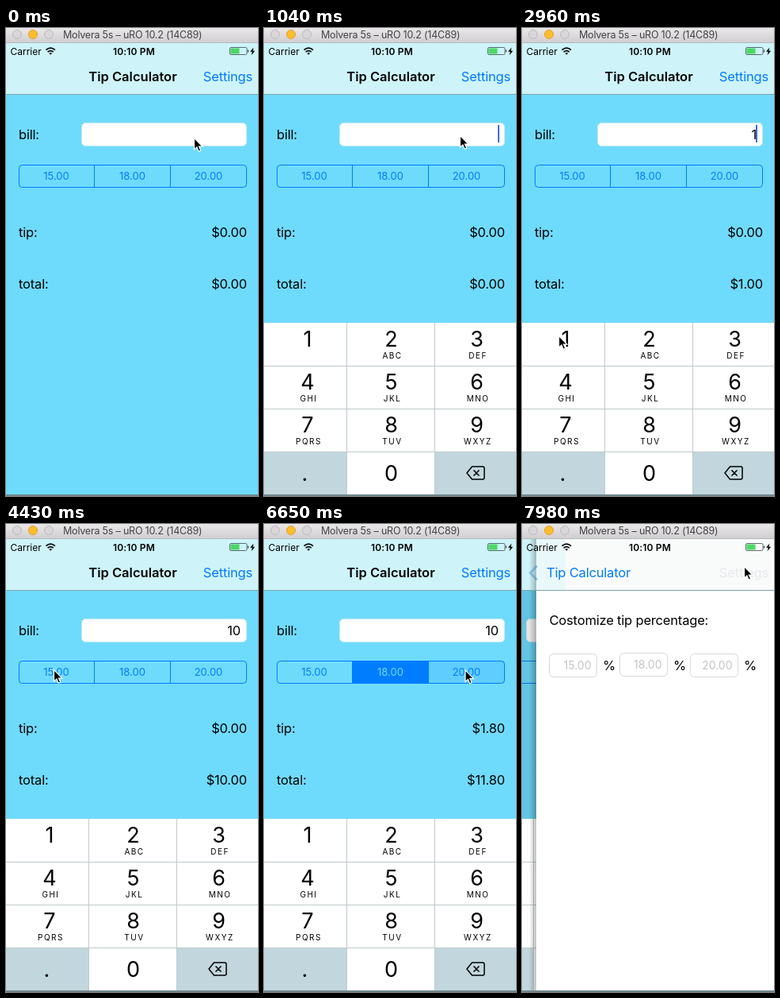
Recreate the animation shown at these times as an HTML page. Size 318 by 589 pixels, loop 8000 ms.

```html
<!DOCTYPE html>
<html lang="en">
<head>
<meta charset="utf-8">
<title>Tip Calculator</title>
<style>
  html, body { margin: 0; width: 100%; height: 100%; overflow: hidden; background: #fff; }
  svg { display: block; width: 318px; height: 589px; cursor: default; }
  text { font: 16.5px Inter, Roboto, sans-serif; letter-spacing: -.18px; white-space: pre; }
  .end { text-anchor: end; }
  .mid { text-anchor: middle; }
  .blue { fill: #007aff; }
  .title { font-weight: 600; letter-spacing: 0; }
  .small { font-size: 12px; letter-spacing: 0; }
  .clock { font-weight: 600; letter-spacing: .15px; }
  .window { font-size: 12.5px; letter-spacing: -.2px; fill: #444; }
  .seg { font-size: 13px; letter-spacing: 0; }
  .digit { font-size: 27px; letter-spacing: 0; }
  .abc { font-size: 10px; letter-spacing: 1.5px; }
  .hint { font-size: 14px; letter-spacing: 0; fill: #c4c4c9; }
</style>
</head>
<body>
<svg viewBox="0 0 318 589">
  <defs>
    <linearGradient id="chrome" x2="0" y2="1">
      <stop stop-color="#e9e7e9"/><stop offset="1" stop-color="#d1cfd1"/>
    </linearGradient>
    <linearGradient id="edge">
      <stop stop-opacity="0"/><stop offset="1" stop-opacity=".25"/>
    </linearGradient>
    <clipPath id="segClip"><rect x="16" y="172" width="288" height="29" rx="4"/></clipPath>
  </defs>

  <g id="main">
    <rect y="84" width="420" height="505" fill="#6fdbfc"/>
    <text x="16" y="140">bill:</text>
    <text x="16" y="263">tip:</text>
    <text x="16" y="328">total:</text>
    <rect x="95.5" y="119.5" width="208" height="29" rx="5" fill="#fff" stroke="#c3e8f2"/>
    <text id="bill" class="end" x="296" y="139.5"></text>
    <rect id="caret" x="295" y="122" width="2" height="22" fill="#426bd9"/>
    <g id="segments"></g>
    <text id="tip" class="end" x="304" y="263"></text>
    <text id="total" class="end" x="304" y="328"></text>
  </g>
  <rect id="dim" y="84" width="318" height="505" opacity=".1"/>
  <g id="keys"></g>

  <g id="settings">
    <rect x="9" y="84" width="9" height="505" fill="url(#edge)"/>
    <rect x="18" y="84" width="300" height="505" fill="#fff"/>
    <text x="34.5" y="127">Costomize tip percentage:</text>
  </g>

  <rect y="18" width="318" height="65" fill="#cef4f9"/>
  <g id="pushedNav">
    <rect x="9" y="18" width="9" height="65" fill="url(#edge)"/>
    <rect x="18" y="18" width="37" height="65" fill="#e9f8fb"/>
    <rect x="55" y="18" width="263" height="65" fill="#f9fbfb"/>
    <path d="M19 52.500l-8.500 9 8.500 9" fill="none" stroke="#3f86cc" stroke-width="3" opacity=".45"/>
    <text class="blue" x="31" y="67">Tip Calculator</text>
  </g>
  <rect y="83" width="318" height="1" fill="#7ea6b0"/>
  <text id="title" class="title mid" x="160" y="67">Tip Calculator</text>
  <text id="gear" class="blue end" x="311" y="67">Settings</text>

  <text class="small" x="5.500" y="34">Carrier</text>
  <g fill="none" stroke="#000" stroke-width="1.700">
    <path d="M50.500 27.700q5.700-5 11.400 0M52.600 30.200q3.600-3 7.200 0"/>
    <path d="M54.300 31.800q1.900-1.500 3.800 0l-1.900 2z" fill="#000" stroke="none"/>
  </g>
  <text class="small clock mid" x="161.500" y="34">10:10 PM</text>
  <rect x="282.500" y="24.500" width="21.500" height="9" rx="1.500" fill="none" stroke="#3b4a4d" stroke-width=".8"/>
  <rect x="283.500" y="25.500" width="11" height="7" fill="#4cd964"/>
  <rect x="304.800" y="27.500" width="1.300" height="3" fill="#3b4a4d"/>
  <path d="M312.500 24.500l-4.500 5.300h2.700l-1.200 4.400 4.700-5.500h-2.800z"/>

  <rect width="318" height="18" fill="url(#chrome)"/>
  <rect y="18" width="318" height="1" fill="#b5b9bb"/>
  <circle cx="14" cy="8" r="5.500" fill="#d8d6d8" stroke="#bbb9bb"/>
  <circle cx="34" cy="8" r="5.500" fill="#fdbd2f" stroke="#e0a029"/>
  <circle cx="54" cy="8" r="5.500" fill="#d8d6d8" stroke="#bbb9bb"/>
  <text class="window" x="72" y="13">Molvera 5s – uRO 10.2 (14C89)</text>
  <rect y="587" width="318" height="2" fill="#70878e"/>
  <path id="arrow" d="M0 0v14.500l3.400-3.100 2.300 5.300 2.500-1.100-2.300-5h4.500z" stroke="#fff" stroke-width="1.200"/>
</svg>
<script>
const LOOP = 8000, TICK = 147.7;       // the screen refreshes once per tick
const PRESS = 295, BLINK = 960, LIT = 590;
const $ = id => document.getElementById(id);

function add(parent, tag, attrs, text = '') {
  const el = document.createElementNS('http://www.w3.org/2000/svg', tag);
  for (const k in attrs) el.setAttribute(k, attrs[k]);
  el.textContent = text;
  return parent.appendChild(el);
}

// Segmented control
const rates = [15, 18, 20];
const segs = rates.map((rate, i) => {
  const box = add($('segments'), 'rect', {
    x: 16 + 96 * i, y: 172, width: 96, height: 29, fill: '#007dff', 'clip-path': 'url(#segClip)'
  });
  const label = add($('segments'), 'text', { class: 'seg mid', x: 63.5 + 96 * i, y: 191 }, rate.toFixed(2));
  return { box, label };
});
add($('segments'), 'rect', { x: 16.5, y: 172.5, width: 287, height: 28, rx: 4, fill: 'none', stroke: '#007aff' });
add($('segments'), 'path', { d: 'M111.500 172v29M207.500 172v29', stroke: '#007aff' });

// Keypad
const letters = ['', 'ABC', 'DEF', 'GHI', 'JKL', 'MNO', 'PQRS', 'TUV', 'WXYZ'];
const keys = {};
[...'123456789.0<'].forEach((name, i) => {
  const col = i % 3, y = 371 + 54 * Math.floor(i / 3), cx = 54 + 108 * col - col * (col - 1) / 2 * 0 + (col ? -1.5 : 1);
  const fill = '.<'.includes(name) ? '#c2d6dd' : '#fff';
  const rect = add($('keys'), 'rect', { x: Math.max(0, 111 * col - 6), y, width: 111, height: 54, fill });
  keys[name] = { rect, fill };
  if (name === '<') {
    add($('keys'), 'path', {
      d: 'M262.500 552h13.500q2 0 2 2v12q0 2-2 2h-13.500l-6.500-8zM264.500 556.500l7 7M271.500 556.500l-7 7',
      fill: 'none', stroke: '#000', 'stroke-width': 1.5, 'stroke-linejoin': 'round'
    });
    return;
  }
  add($('keys'), 'text', { class: 'digit mid', x: name === '.' ? 51.5 : cx, y: y + (i > 8 ? 37 : 30) }, name);
  if (letters[i]) add($('keys'), 'text', { class: 'abc mid', x: cx + 1.5, y: y + 45 }, letters[i]);
});
add($('keys'), 'path', {
  d: 'M0 425.500h318M0 479.500h318M0 533.500h318M104.500 371v216M215.500 371v216', stroke: '#c0cacd', fill: 'none'
});

// Settings fields
rates.forEach((rate, i) => {
  const x = 34.5 + 89 * i, y = i === 1 ? 162.5 : 163.5;
  add($('settings'), 'rect', { x, y, width: 60, height: 29, rx: 5, fill: '#fff', stroke: '#d8d8d8' });
  add($('settings'), 'text', { class: 'hint end', x: x + 53, y: y + 19.5 }, rate.toFixed(2));
  add($('settings'), 'text', { x: x + 67.5, y: 183.5 }, '%');
});

// Where the pointer rests, when, and what it taps there
const stops = [
  { x: 237.5, y: 138.5, from: 0, to: 590 },
  { x: 247.5, y: 135.5, from: 1030, to: 1950 },
  { x: 80, y: 512, from: 2300, to: 2300 },
  { x: 46.5, y: 387.5, from: 2500, to: 2960, tap: 2800, key: '1' },
  { x: 148, y: 570, from: 3540, to: 3850, tap: 3840, key: '0' },
  { x: 60.5, y: 183.5, from: 4430, to: 5020, tap: 4870, seg: 0 },
  { x: 157.5, y: 183.5, from: 5700, to: 6210, tap: 6060, seg: 1 },
  { x: 254, y: 184, from: 6640, to: 7000, tap: 6940, seg: 2 },
  { x: 280.5, y: 53.5, from: 7530, to: LOOP, tap: 7970, push: true }
];
const FOCUS = 700, KEYS_UP = 1030;

const clamp = v => Math.min(1, Math.max(0, v));
const smooth = v => v * v * (3 - 2 * v);
const money = v => '$' + v.toFixed(2);
const show = (id, on) => $(id).setAttribute('visibility', on ? 'visible' : 'hidden');

function pointer(t) {
  const i = stops.findLastIndex(s => t >= s.from), a = stops[i], b = stops[i + 1] || a;
  const f = a === b ? 0 : smooth(clamp((t - a.to) / (b.from - a.to)));
  return [a.x + (b.x - a.x) * f, a.y + (b.y - a.y) * f];
}

function render(t) {
  const done = stops.filter(s => t >= s.tap);
  const down = stops.find(s => t >= s.tap - PRESS && t < s.tap) || {};
  const typed = done.filter(s => s.key), picked = done.filter(s => 'seg' in s).pop();
  const pushed = done.some(s => s.push), dx = pushed ? -90 : 0;

  const text = typed.map(s => s.key).join(''), amount = Number(text);
  const tip = picked ? amount * rates[picked.seg] / 100 : 0;
  $('bill').textContent = text;
  $('tip').textContent = money(tip);
  $('total').textContent = money(amount + tip);

  // Every edit restarts the blink
  const edited = typed.length ? typed[typed.length - 1].tap : KEYS_UP;
  show('caret', t >= FOCUS && (t - edited) % BLINK < LIT);

  segs.forEach(({ box, label }, i) => {
    const on = picked && picked.seg === i;
    box.setAttribute('fill-opacity', on ? 1 : down.seg === i ? .15 : 0);
    label.setAttribute('fill', on ? '#6fdbfc' : '#007aff');
  });
  for (const k in keys) keys[k].rect.setAttribute('fill', k === down.key ? '#c2d6dd' : keys[k].fill);

  const drop = 218 * (1 - clamp((t - FOCUS) / (KEYS_UP - FOCUS))) ** 3;
  $('main').setAttribute('transform', `translate(${dx} 0)`);
  $('keys').setAttribute('transform', `translate(${dx} ${drop})`);
  for (const id of ['dim', 'settings', 'pushedNav']) show(id, pushed);
  show('title', !pushed);
  $('gear').setAttribute('opacity', pushed ? .1 : down.push ? .22 : 1);
  $('gear').style.fill = pushed ? '#456' : '';
  $('arrow').setAttribute('transform', `translate(${pointer(t)})`);
}

function frame() {
  const now = performance.now() % LOOP;
  render(Math.floor((now + 5) / TICK) * TICK);
  requestAnimationFrame(frame);
}
frame();
</script>
</body>
</html>
```
